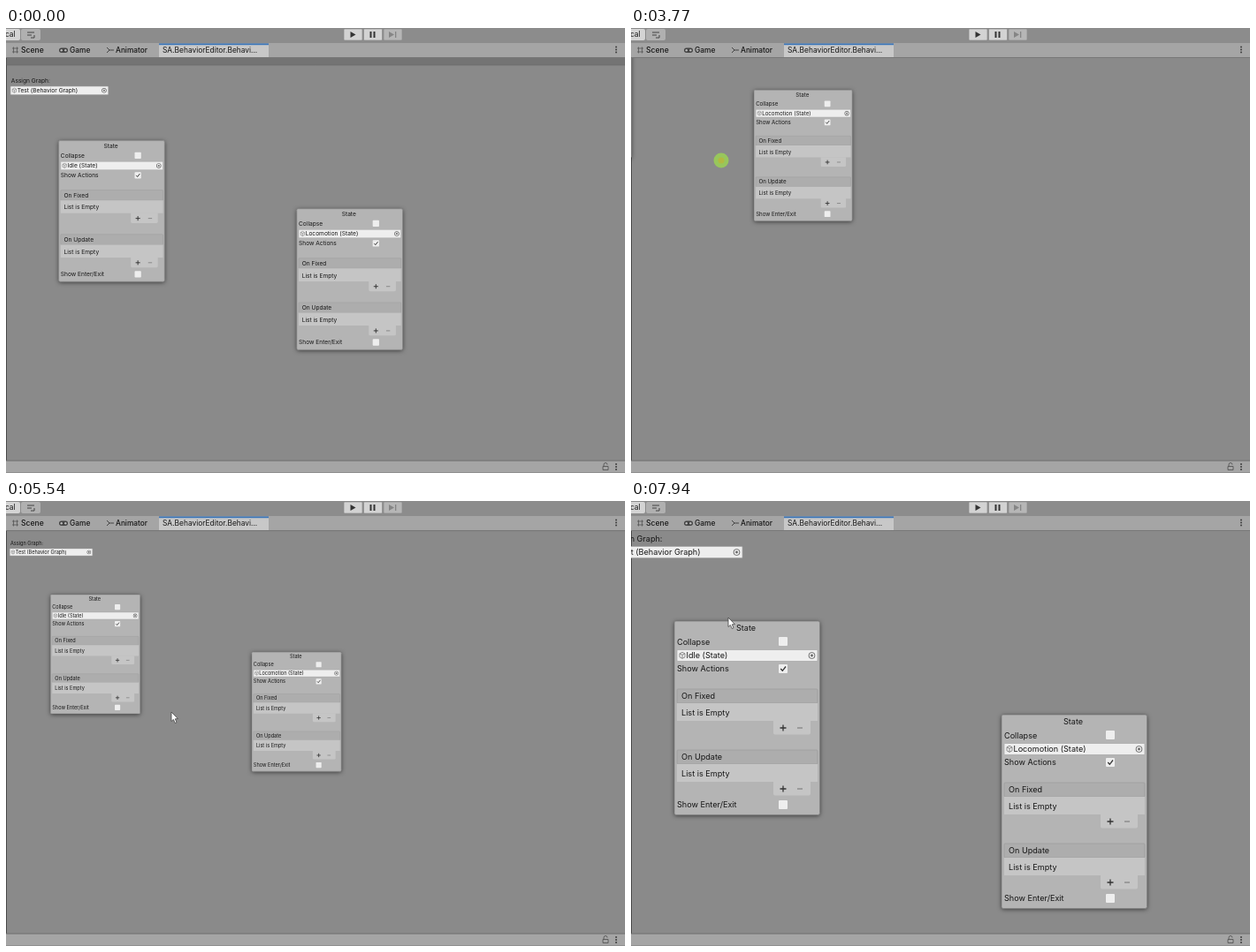
Write an HTML page with a canvas that moves like this. It is 700 by 504 pixels and loops after 8 s.

```html
<!DOCTYPE html>
<html lang="en">
<head>
<meta charset="utf-8">
<title>Behavior graph editor</title>
<style>
html, body { margin: 0; width: 100%; height: 100%; overflow: hidden; background: #a5a5a5; }
canvas { display: block; }
</style>
</head>
<body>
<canvas id="stage" width="700" height="504"></canvas>
<script>
const ctx = document.getElementById('stage').getContext('2d');
const LOOP = 8000, TICKS = 104;
const INK = '#171717';

// A track rests between its moves; each move is [from tick, to tick, ...value reached]
function track(start, moves) {
  return tick => moves.reduce((now, [from, to, ...goal]) => {
    const f = Math.min(1, Math.max(0, (tick - from) / (to - from)));
    return now.map((v, i) => v + (goal[i] - v) * f);
  }, start);
}

const zoomAt = track([.7275], [
  [13, 24, .592], [26, 29, .478], [29, 31, .6], [32, 36, 1], [39, 42, .675],
  [66, 72, .615], [74, 76, .5], [78, 80, .43], [83, 86, .5], [87, 90, .81], [99, 103, 1]
]);
const panAt = track([0, 0], [
  [43, 49, -166, -122], [49, 62, -357, -8], [62, 72, 0, -7], [74, 76, 0, 0], [90, 98, -33, -27]
]);
// The hand is measured from the panned origin, so a drag carries the pointer along
const handAt = track([598, 413], [
  [9, 11, 254, 138], [13, 24, 300, 287], [31, 37, 202, 181], [39, 43, 268, 272],
  [53, 55, 481, 338], [65, 72, 187, 246], [83, 90, 325, 319], [99, 103, 143, 159]
]);
const between = (tick, from, to) => tick >= from && tick <= to;

function rect(x, y, w, h, fill, r = 0, line) {
  ctx.beginPath();
  ctx.roundRect(x, y, w, h, r);
  ctx.fillStyle = fill;
  ctx.fill();
  if (line) stroke(line, .7);
}

function stroke(color, width) {
  ctx.strokeStyle = color;
  ctx.lineWidth = width;
  ctx.stroke();
}

function line(x1, y1, x2, y2, color = '#333', width = 1) {
  ctx.beginPath();
  ctx.moveTo(x1, y1);
  ctx.lineTo(x2, y2);
  stroke(color, width);
}

function shape(d, x, y, fill, outline, width = 1) {
  ctx.save();
  ctx.translate(x, y);
  const p = new Path2D(d);
  if (fill) {
    ctx.fillStyle = fill;
    ctx.fill(p);
  }
  if (outline) {
    ctx.strokeStyle = outline;
    ctx.lineWidth = width;
    ctx.stroke(p);
  }
  ctx.restore();
}

function dot(x, y, r, fill) {
  ctx.beginPath();
  ctx.arc(x, y, r, 0, 7);
  ctx.fillStyle = fill;
  ctx.fill();
}

function text(str, x, y, size = 9.1, align = 'left', weight = 400) {
  ctx.font = `${weight} ${size}px Inter, sans-serif`;
  ctx.textAlign = align;
  ctx.textBaseline = 'middle';
  ctx.fillStyle = INK;
  ctx.fillText(str, x, y + .3);
}

function checkbox(y, checked) {
  rect(118, y - 5, 10, 10, '#eee', 1);
  if (checked) shape('M-2.7 0l2 2.3L3 -2.5', 123, y, null, '#333', 1.3);
}

function field(label, x, y, w) {
  rect(x, y, w, 13, '#eee', 1, '#a5a5a5');
  shape('M-3 -2l3 -1.5l3 1.5v4l-3 1.5l-3 -1.5zl3 1.5l3 -1.5M0 -.5v4', x + 6, y + 6.3, null, '#777', .8);
  text(label, x + 10.5, y + 6.5);
  dot(x + w - 6.5, y + 6.5, 3.8, '#666');
  dot(x + w - 6.5, y + 6.5, 2.9, '#eee');
  dot(x + w - 6.5, y + 6.5, 1.4, '#666');
}

function list(title, y) {
  rect(3, y, 159, 16, '#adadad', 1, '#9c9c9c');
  rect(3, y + 16, 159, 20, '#c5c5c5');
  rect(112, y + 35.5, 42, 16, '#c5c5c5', [0, 0, 2, 2]);
  text(title, 8, y + 8);
  text('List is Empty', 8, y + 27);
  shape('M-3.5 0h7M0 -3.5v7', 123, y + 44, null, '#333', 1.3);
  line(139, y + 44, 145, y + 44, '#808080', 1.2);
}

function node(name, x, y) {
  ctx.save();
  ctx.translate(x, y);
  ctx.shadowColor = 'rgba(0,0,0,.6)';
  ctx.shadowBlur = 5;
  ctx.shadowOffsetY = 1;
  rect(0, 0, 164.5, 219.5, '#b4b4b4', 2);
  ctx.shadowColor = 'transparent';
  rect(0, 0, 164.5, 219.5, '#b4b4b4', 2, '#787878');
  text('State', 81, 8, 9.1, 'center');
  text('Collapse', 3, 23.5);
  checkbox(23, false);
  field(`${name} (State)`, 3, 32.5, 159);
  text('Show Actions', 3, 54);
  checkbox(54, true);
  list('On Fixed', 77);
  list('On Update', 146);
  text('Show Enter/Exit', 3, 208);
  checkbox(208, false);
  ctx.restore();
}

function graph(tick) {
  const [zoom] = zoomAt(tick), [panX, panY] = panAt(tick);
  ctx.save();
  ctx.beginPath();
  ctx.rect(0, 33, 700, 457);
  ctx.clip();
  rect(0, 33, 700, 457, '#8a8a8a');
  line(.5, 33, .5, 490, '#4c4c4c');
  ctx.translate(panX, 33 + panY);
  ctx.scale(zoom, zoom);
  rect(1, 0, 4000, 12.5, '#747474', [4, 0, 0, 0]);
  line(1, 12.5, 4000, 12.5, '#676767', .8);
  text('Assign Graph:', 8, 36.5);
  field('Test (Behavior Graph)', 7, 45.5, 152);
  node('Idle', 82, 130);
  node('Locomotion', 452, 236);
  ctx.restore();
}

function kebab(x, y) {
  for (const d of [-3, 0, 3]) dot(x, y + d, .9, '#333');
}

function chrome() {
  rect(0, 0, 700, 17, '#8c8c8c');
  rect(0, 17, 700, 16, '#a5a5a5');
  rect(-4, 1, 20, 13, '#d4d4d4', 2);
  text('cal', -1, 7.5, 8.4);
  rect(17, 1, 22, 13, '#b0b0b0', 2);
  shape('M0 0h8M0 3h5M4 6h4v-3', 24, 5, null, '#444');

  for (const [i, fill] of ['#d3d3d3', '#d3d3d3', '#b6b6b6'].entries())
    rect(382 + i * 22.5, 1, 21, 13, fill, 1, '#8a8a8a');
  const triangle = 'M0 -3.5l6 3.5l-6 3.5z';
  shape(triangle, 389.5, 7.5, '#333');
  for (const x of [411.5, 415.5]) rect(x, 4, 2, 7, '#333');
  shape(triangle, 433, 7.5, '#858585');
  rect(440, 4, 1.3, 7, '#858585');

  rect(173, 18, 124, 15, '#c8c8c8');
  rect(173, 17.5, 124, 1.7, '#3a75b8');
  text('Scene', 17, 25.3, 8.6, 'left', 500);
  text('Game', 72, 25.3, 8.4, 'left', 500);
  text('Animator', 124, 25.3, 8.3, 'left', 500);
  text('SA.BehaviorEditor.Behavi...', 177, 25.3, 8.4);
  shape('M-3.5 -2h7m-7 4h7M-2 -3.5v7m4 -7v7', 10.5, 25, null, '#555', .8);
  rect(60, 22.5, 10, 5.5, '#444', 2.7);
  for (const x of [62.7, 67.3]) dot(x, 25.2, 1.2, '#bbb');
  shape('M-3 -3l3 3l-3 3M0 0h5', 117, 25, null, '#444');
  kebab(690, 24.5);
  line(0, 33.5, 700, 33.5, '#787878');

  rect(0, 490, 700, 14, '#a5a5a5');
  line(0, 490, 700, 490, '#6c6c6c');
  line(0, 503.5, 700, 503.5, '#909090');
  shape('M-3 0h6v4h-6zM-2 0v-2a2 2 0 0 1 4 0', 678, 496.5, null, '#555', .9);
  kebab(690, 497);
}

function cursor(tick) {
  if (tick < 9) return;
  const pan = panAt(tick);
  const [x, y] = handAt(tick).map((v, i) => v + pan[i]);
  if (between(tick, 44, 54)) {
    dot(x, y, 8.5, '#98c65c');
    dot(x, y, 3.5, '#b2b942');
    return;
  }
  if (between(tick, 55, 65) || between(tick, 88, 98)) dot(x - .5, y, 8.5, '#c2c144');
  shape('M0 0V10.5L2.4 8.4L4.2 12.5L6 11.7L4.3 7.8L7.4 7.6Z', x, y, '#fff', '#444', .8);
}

const start = performance.now();
function draw(now) {
  const t = Math.max(0, now - start) % LOOP;
  // The screen refreshes 13 times a second
  const tick = Math.min(TICKS - 1, Math.floor(t * TICKS / LOOP + .25));
  graph(tick);
  chrome();
  cursor(tick);
  requestAnimationFrame(draw);
}
draw(start);
</script>
</body>
</html>
```
